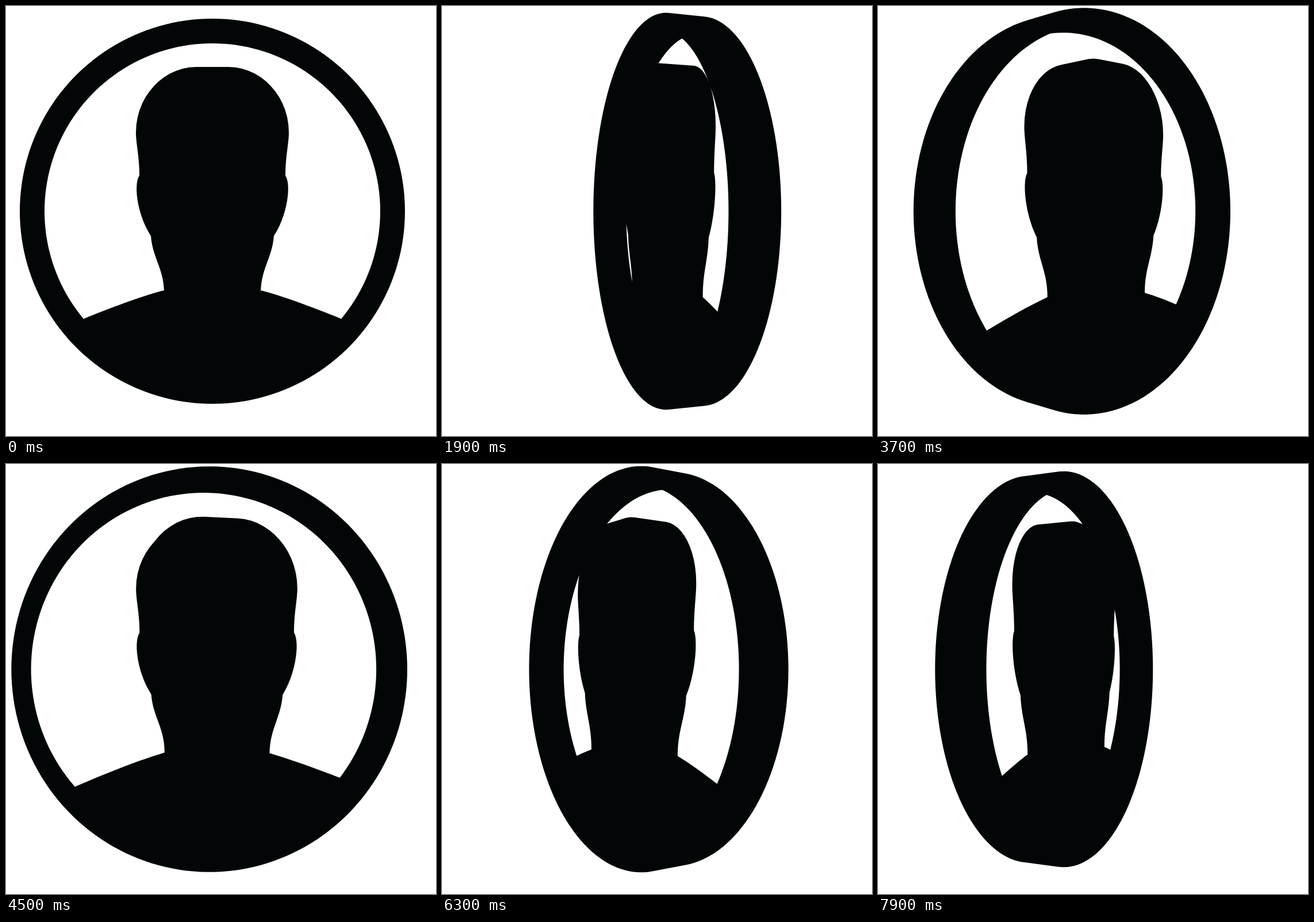
Write an HTML page with a canvas that moves like this. It is 748 px wide and 748 px high and loops after 8000 ms.

```html
<!DOCTYPE html>
<html lang="en">
<head>
<meta charset="utf-8">
<title>Turning profile icon</title>
<style>
  html, body { margin: 0; width: 100%; height: 100%; overflow: hidden; background: #fff; }
  canvas { display: block; width: 100vmin; height: 100vmin; }
</style>
</head>
<body>
<canvas id="stage" width="748" height="748"></canvas>
<script>
const SIZE = 748, LOOP = 8000, STEP = 100;
const CX = 359, CY = 357;      // pivot: centre of the front face
const OUTER = 335, INNER = 306.6, DEPTH = 65, CAMERA = 1300;
const ctx = document.getElementById('stage').getContext('2d');

// Turn around the vertical axis: [ms, degrees]
const TURN = [
  [0, 0], [900, 32.4], [1300, 47.4], [1800, 65.2], [2600, 97.5], [3600, 133.5],
  [3700, 137], [5300, 198.3], [5400, 202], [6300, 235], [7900, 296], [8000, 299.8]
];

function angleAt(ms) {
  const i = TURN.findIndex(key => key[0] > ms);
  const [t0, a0] = TURN[i - 1], [t1, a1] = TURN[i];
  return (a0 + (a1 - a0) * (ms - t0) / (t1 - t0)) * Math.PI / 180;
}

function arc(radius, from, to, count) {
  return Array.from({ length: count }, (_, i) => {
    const a = from + (to - from) * i / count;
    return [radius * Math.cos(a), radius * Math.sin(a)];
  });
}

function cubic(p, count = 14) {
  return Array.from({ length: count }, (_, i) => {
    const t = (i + 1) / count, u = 1 - t;
    const mix = k => u * u * u * p[0][k] + 3 * u * u * t * p[1][k] + 3 * u * t * t * p[2][k] + t * t * t * p[3][k];
    return [mix(0), mix(1)];
  });
}

// Right half of the bust, from the crown down to the shoulder's end
const shoulder = Math.atan2(196.5, 235.3);
const shoulderEnd = [INNER * Math.cos(shoulder), INNER * Math.sin(shoulder)];
const half = [
  [28, -251],
  ...cubic([[28, -251], [85, -251], [133, -200], [133, -137]]),
  ...cubic([[133, -137], [133, -118], [127, -95], [127, -62]]),
  ...cubic([[127, -62], [137, -48], [132, 4], [107, 43]]),
  ...cubic([[107, 43], [104, 82], [84, 100], [84, 143]]),
  ...cubic([[84, 143], [135, 157], [190, 178], shoulderEnd])
];
const mirrored = half.map(([x, y]) => [-x, y]);

const rim = arc(OUTER, 0, 2 * Math.PI, 180);
const hole = [
  ...arc(INNER, Math.PI - shoulder, 2 * Math.PI + shoulder, 130),
  ...half.slice().reverse(),
  ...mirrored.slice(0, -1)
];

function project(points, z, angle) {
  const c = Math.cos(angle), s = Math.sin(angle);
  return points.map(([x, y]) => {
    const scale = CAMERA / (CAMERA - x * s - z * c);
    return [CX + (x * c - z * s) * scale, CY + y * scale];
  });
}

function area(points) {
  return points.reduce((sum, [x, y], i) => {
    const [nx, ny] = points[(i + 1) % points.length];
    return sum + x * ny - nx * y;
  }, 0);
}

function addLoop(path, points) {
  points.forEach(([x, y], i) => i ? path.lineTo(x, y) : path.moveTo(x, y));
  path.closePath();
}

// All pieces wind the same way, so they merge into one solid outline
function addFace(path, edge, gap) {
  const flipped = area(edge) < 0;
  addLoop(path, flipped ? edge.slice().reverse() : edge);
  addLoop(path, flipped ? gap : gap.slice().reverse());
}

function addWall(path, front, back) {
  front.forEach((p, i) => {
    const j = (i + 1) % front.length;
    const quad = [p, front[j], back[j], back[i]];
    addLoop(path, area(quad) < 0 ? quad.reverse() : quad);
  });
}

function draw(ms) {
  const angle = angleAt(ms);
  const [rimFront, rimBack] = [0, -DEPTH].map(z => project(rim, z, angle));
  const [holeFront, holeBack] = [0, -DEPTH].map(z => project(hole, z, angle));
  const path = new Path2D();
  addFace(path, rimFront, holeFront);
  addFace(path, rimBack, holeBack);
  addWall(path, rimFront, rimBack);
  addWall(path, holeFront, holeBack);
  ctx.fillStyle = '#fff';
  ctx.fillRect(0, 0, SIZE, SIZE);
  ctx.fillStyle = '#020606';
  ctx.fill(path, 'nonzero');
}

const start = performance.now();
function tick() {
  const ms = (performance.now() - start) % LOOP;
  draw(Math.floor(ms / STEP) * STEP);
  requestAnimationFrame(tick);
}
tick();
</script>
</body>
</html>
```
